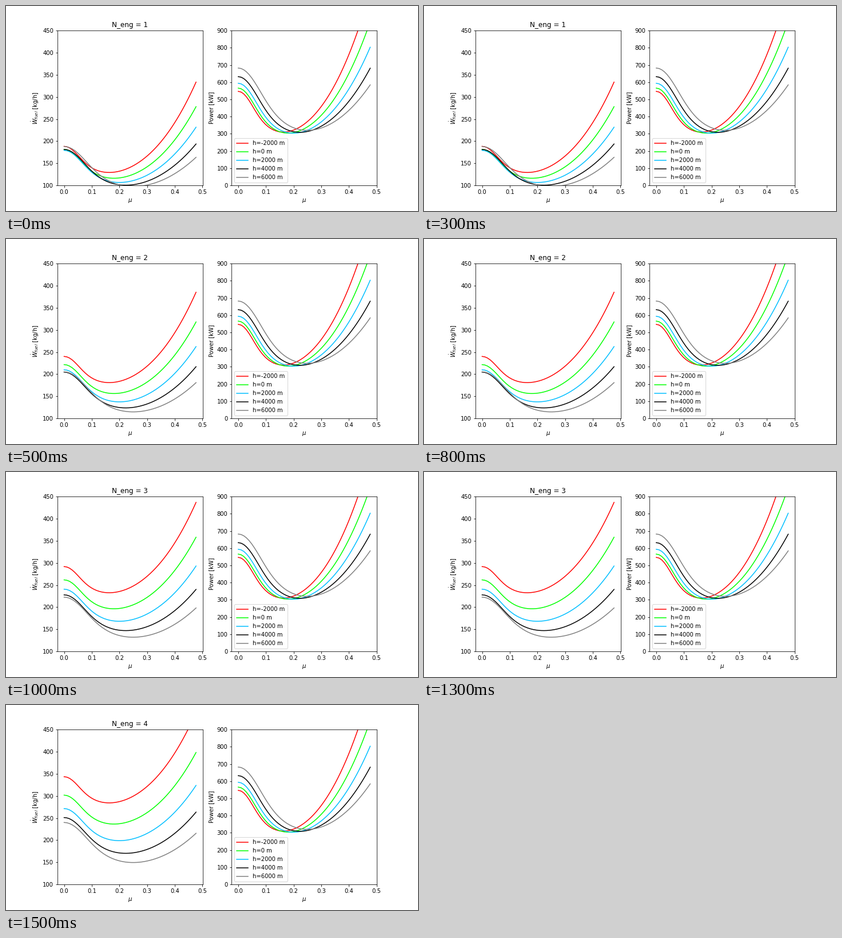
Animation of 720 by 360 pixels, one loop 2000 ms. Source, as a matplotlib script:

```python
import numpy as np
import matplotlib.pyplot as plt
from matplotlib.animation import FuncAnimation

plt.rcParams["font.family"] = "DejaVu Sans"

ALTITUDES = [-2000, 0, 2000, 4000, 6000]
COLORS = ["red", "lime", "deepskyblue", "black", "gray"]

INDUCED = 458.2      # hover induced power at sea level, kW
PROFILE = 107.3      # hover profile power at sea level, kW
PARASITE = 6234      # parasite power coefficient, kW
INFLOW = 0.0569      # hover inflow ratio at sea level
IDLE_FLOW = 40.1     # fuel flow per engine at zero power, kg/h
FUEL_SLOPE = 0.25    # kg/h per kW

mu = np.linspace(0, 0.4769, 50)


def atmosphere(h):
    """Temperature, pressure and density ratios of the standard atmosphere."""
    theta = 1 - 0.0065 * h / 288.15
    delta = theta ** 5.2559
    return theta, delta, delta / theta


def power(h):
    sigma = atmosphere(h)[2]
    x = mu * np.sqrt(sigma) / INFLOW
    inflow = np.sqrt(np.sqrt(x**4 / 4 + 1) - x**2 / 2)
    drag = PROFILE * (1 + 4.65 * mu**2) + PARASITE * mu**3
    return INDUCED / np.sqrt(sigma) * inflow + sigma * drag


def fuel_flow(h, engines):
    theta, delta, _ = atmosphere(h)
    return engines * IDLE_FLOW * delta * np.sqrt(theta) + FUEL_SLOPE * power(h)


fig, (ax_fuel, ax_power) = plt.subplots(1, 2, figsize=(10, 5), dpi=72)
fig.subplots_adjust(left=0.125, right=0.9, bottom=0.125, top=0.88, wspace=0.2)

fuel_lines = []
for h, color in zip(ALTITUDES, COLORS):
    fuel_lines += ax_fuel.plot(mu, fuel_flow(h, 1), color=color)
    ax_power.plot(mu, power(h), color=color, label=f"h={h} m")

ax_fuel.set(xlabel=r"$\mu$", ylabel=r"$\dot{W}_{fuel}$ [kg/h]", ylim=(100, 450))
ax_power.set(xlabel=r"$\mu$", ylabel="Power [kW]", ylim=(0, 900))
ax_power.legend(loc="lower left")
title = ax_fuel.set_title("N_eng = 1")


def update(i):
    engines = i + 1
    title.set_text(f"N_eng = {engines}")
    for line, h in zip(fuel_lines, ALTITUDES):
        line.set_ydata(fuel_flow(h, engines))
    return [title, *fuel_lines]


anim = FuncAnimation(fig, update, frames=4, interval=500, repeat=True,
                     repeat_delay=0, blit=False)
plt.show()
```
